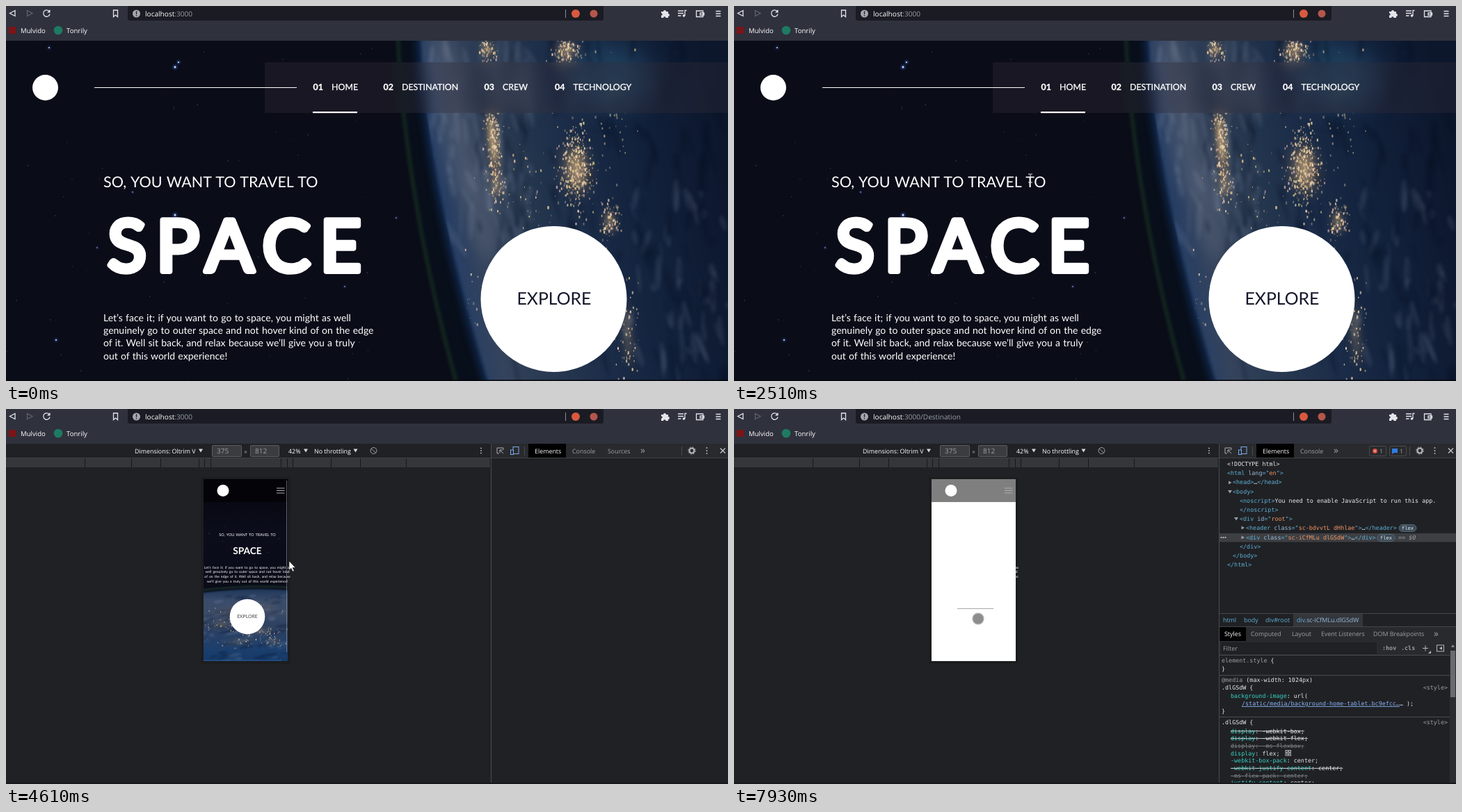
Recreate the animation shown at these times as an HTML page with a canvas. Size 1038 px wide and 540 px high, loop 8000 ms.

```html
<!DOCTYPE html>
<html lang="en">
<head>
<meta charset="utf-8">
<title>Space travel site walkthrough</title>
<style>
html, body { margin: 0; width: 100%; height: 100%; overflow: hidden; background: #121212; }
#stage { position: relative; width: 1038px; height: 540px; overflow: hidden; background: #121212; }
#stage > * { position: absolute; left: 0; top: 0; }
#stage > #wide { top: 50px; }
#stage > #small { left: 284px; top: 101px; }
text { white-space: pre; fill: #fff; text-rendering: geometricPrecision; }
.n { font-family: Lato, sans-serif; word-spacing: .05em; }
.u { font-family: "Open Sans", "Noto Sans", sans-serif; font-size: 8.9px; }
.m { font-family: "DejaVu Sans Mono", "Liberation Mono", monospace; font-size: 8.4px; }
.m text { fill: #e8eaed; }
.b { font-weight: 700; }
.mid { text-anchor: middle; }
.end { text-anchor: end; }
.nav { font-size: 12.4px; stroke: #fff; stroke-width: .3; }
.dim, .m .dim { fill: #9aa0a6; }
.ln { fill: none; stroke: #e4e5ea; stroke-width: 1.3; }
.tag { fill: #5db0d7; }
.attr { fill: #9bbbdc; }
.val { fill: #f29766; }
.prop { fill: #35d4c7; }
.off { text-decoration: line-through; }
.m .off.faint, .off.faint .prop { fill: #80868b; }
.link { fill: #8ab4f8; text-decoration: underline; }
</style>
</head>
<body>
<div id="stage">

<svg class="tools" width="1038" height="540">
  <rect y="50" width="1038" height="490" fill="#202124"/>
  <rect x="280" y="98" width="129" height="269" fill="#1c1d1f"/>
  <rect y="71" width="697" height="13" fill="#35363a"/>
  <path d="M0 70.5H1038" stroke="#3f4145"/>
  <path id="ticks" stroke="#17181a"/>
  <g class="u">
    <text x="185" y="63.5">Dimensions: Oltrim V</text>
    <g fill="#3b3c3f" stroke="#5b5d61"><rect x="296.500" y="52.500" width="42" height="16" rx="1"/><rect x="351.500" y="52.500" width="41" height="16" rx="1"/></g>
    <text class="dim" x="303" y="64" font-size="10">375</text>
    <text class="dim" x="358" y="64" font-size="10">812</text>
    <text class="dim" x="342" y="65">×</text>
    <text x="406" y="63.500">42%</text>
    <text x="443" y="63.500">No throttling</text>
    <path d="M277 57.500h6l-3 5zM428 57.500h6l-3 5zM499.500 57.500h6l-3 5z" fill="#d5d7da"/>
    <g fill="none" stroke="#9aa0a6"><circle cx="528.500" cy="60" r="4.500"/><path d="M525 57l7 6.500"/></g>
    <g fill="#a9adb2"><circle cx="683" cy="56.500" r="1"/><circle cx="683" cy="60" r="1"/><circle cx="683" cy="63.500" r="1"/></g>
  </g>
  <path d="M697.500 50V540" stroke="#4a4c50"/>

  <g class="u">
    <rect x="698" y="50" width="340" height="20" fill="#292a2d"/>
    <path d="M745.500 54V67M971.500 54V67" stroke="#4a4c50"/>
    <g fill="none" stroke="#a9adb2"><path d="M709 64h-3v-8h9v3M710 59l5 5m-5-5v4m0-4h4"/></g>
    <g fill="none" stroke="#7cacf0"><rect x="729" y="54.500" width="8" height="10"/><rect x="725.500" y="59" width="4" height="6.500" fill="#292a2d"/></g>
    <rect x="751" y="50" width="54" height="20" fill="#000"/>
    <text x="760" y="63.500">Elements</text>
    <text class="dim" x="814" y="63.500">Console</text>
    <g class="early"><text class="dim" x="865" y="63.500">Sources</text><text class="dim" x="912" y="64" font-size="14">»</text></g>
    <g class="late">
      <text class="dim" x="862" y="64" font-size="14">»</text>
      <g fill="none" stroke="#4a4c50"><rect x="913.500" y="53.500" width="24" height="14" rx="2"/><rect x="942.500" y="53.500" width="24" height="14" rx="2"/></g>
      <circle cx="921.500" cy="60.500" r="3.500" fill="#d8483e"/><path d="M920 59l3 3m0-3l-3 3" stroke="#fff" stroke-width=".8"/>
      <path d="M946 57h8v6h-5l-3 2z" fill="#2f7de0"/>
      <text class="dim" x="928" y="63.500">1</text><text class="dim" x="957" y="63.500">1</text>
    </g>
    <circle cx="986" cy="60" r="3.500" fill="none" stroke="#b5b8bc" stroke-width="2.200"/>
    <circle cx="986" cy="60" r="5.200" fill="none" stroke="#b5b8bc" stroke-dasharray="2 2.080"/>
    <g fill="#b5b8bc"><circle cx="1007.500" cy="56" r="1"/><circle cx="1007.500" cy="60" r="1"/><circle cx="1007.500" cy="64" r="1"/></g>
    <path d="M1027 56.500l7 7m0-7l-7 7" stroke="#c5c8cc" stroke-width="1.300"/>
  </g>

  <g class="dom">
    <rect x="698" y="179" width="340" height="12.500" fill="#3d3f43"/>
    <rect class="picked" x="698" y="179" width="340" height="12.500" fill="#073d69"/>
    <g id="tree" class="m"></g>
    <path d="M711 103.500l4.500 2.500-4.500 2.500zM710 117h6l-3 4.500zM719 156h6l-3 4.500zM729.500 168.500l4.500 2.500-4.500 2.500zM729.500 182.500l4.500 2.500-4.500 2.500z" fill="#9aa0a6"/>
    <g fill="#d0d3d7"><circle cx="700.500" cy="185" r="1"/><circle cx="703.500" cy="185" r="1"/><circle cx="706.500" cy="185" r="1"/></g>
    <g fill="#3b4b57" stroke="#5e7483" stroke-width=".8"><rect x="956" y="166.500" width="25" height="10" rx="5"/><rect x="925" y="180.500" width="25" height="10" rx="5"/></g>
    <g class="m mid" style="font-size:7.200px"><text x="968.500" y="174">flex</text><text x="937.500" y="188">flex</text></g>
    <text class="m dim" x="955" y="188" font-style="italic">== $0</text>
  </g>

  <g class="styles">
    <path d="M698 294.500H1038M698 313.500H1038" stroke="#45474b"/>
    <rect x="804" y="295" width="100" height="18" fill="#33363b"/>
    <g class="u">
      <text class="tag" x="703" y="307">html</text><text class="tag" x="733" y="307">body</text>
      <text class="tag" x="764" y="307">div#root</text>
      <text class="tag" x="809" y="307">div<tspan class="attr">.sc-iCfMLu.dlGSdW</tspan></text>
      <rect x="698" y="314" width="340" height="20" fill="#292a2d"/>
      <rect x="698" y="314" width="38" height="20" fill="#000"/>
      <text x="705" y="327">Styles</text>
      <text class="dim" x="743" y="327">Computed</text><text class="dim" x="802" y="327">Layout</text>
      <text class="dim" x="844" y="327">Event Listeners</text><text class="dim" x="919" y="327">DOM Breakpoints</text>
      <text class="dim" x="1006" y="328" font-size="14">»</text>
      <rect x="698" y="334" width="340" height="21" fill="#292a2d"/>
      <rect x="700" y="336" width="224" height="17" fill="#202124"/>
      <text class="dim" x="703" y="348">Filter</text>
    </g>
    <g class="m"><text class="b dim" x="932" y="347">:hov</text><text class="b dim" x="959" y="347">.cls</text></g>
    <path d="M990 344.500h8M994 340.500v8" stroke="#b5b8bc"/><path d="M1002 348v4h-4z" fill="#b5b8bc"/>
    <rect x="1010.500" y="340" width="10" height="9" fill="none" stroke="#b5b8bc"/><path d="M1018 342v5l-4-2.500z" fill="#b5b8bc"/>
    <path d="M698 354.500H1030M698 383.500H1030M698 443.500H1030" stroke="#4a4c50"/>
    <g id="rules" class="m"></g>
    <g fill="#35383b" stroke="#aeb2b6"><rect x="793" y="491.500" width="3" height="3"/><rect x="797.500" y="491.500" width="3" height="3"/><rect x="793" y="496" width="3" height="3"/><rect x="797.500" y="496" width="3" height="3"/></g>
    <rect x="1029" y="335" width="9" height="205" fill="#2b2c2f"/>
    <rect x="1030" y="348" width="7" height="67" fill="#6a6b6d"/>
    <path d="M1031 343l2.500-4 2.500 4z" fill="#85878a"/>
  </g>
  <rect y="538" width="1038" height="2" fill="#17181b"/>
</svg>

<canvas id="small" class="photo" width="121" height="262"></canvas>

<svg width="1038" height="540">
  <defs><clipPath id="view"><rect x="284" y="101" width="108" height="249"/></clipPath></defs>
  <g class="squeezed">
    <g clip-path="url(#view)">
      <circle cx="339" cy="407" r="86" fill="#fff"/>
      <rect x="376" y="255" width="16" height="95" fill="#000" opacity=".24"/>
      <text class="n b mid" x="338.500" y="126.500" style="font-size:31px;fill:#8b8b8b">SPACE</text>
      <g stroke="#fff" stroke-width="2"><path d="M351 130.500h20M351 138.500h20M351 146.500h20"/></g>
      <circle cx="335.500" cy="138.500" r="18.500" fill="#fff"/>
      <g id="cropped" class="n mid" font-size="11.400"></g>
    </g>
    <path d="M392 101h13v249h-13zM284 350h108v13H284z" fill="#f1f1f1"/>
    <rect x="392" y="350" width="13" height="13" fill="#dcdcdc"/>
    <path d="M394 114h10v141h-10zM297 352h61v10h-61z" fill="#c1c1c1"/>
    <path d="M395.500 110h6l-3-4zM292 353.500v6l-4-3z" fill="#a3a3a3"/>
    <path d="M395.500 341h6l-3 4zM385 353.500v6l4-3z" fill="#505050"/>
  </g>
  <g class="tools">
    <rect x="284" y="101" width="121" height="33" fill="#030308"/>
    <g class="n mid">
      <text x="347" y="183" font-size="5.500">SO, YOU WANT TO TRAVEL TO</text>
      <text class="b" x="347" y="209" font-size="13.700">SPACE</text>
      <g id="blurb" font-size="5.050"></g>
      <circle cx="347" cy="299" r="25.300" fill="#fff"/>
      <text x="347" y="301.300" style="font-size:6.900px;fill:#45464d">EXPLORE</text>
    </g>
    <g class="fresh"><path d="M403.500 103V350" stroke="#8b8d96" opacity=".7"/><path d="M284 362H396" stroke="#2d5f9c"/></g>
    <g class="white">
      <rect x="284" y="101" width="121" height="262" fill="#fff"/>
      <rect x="284" y="101" width="121" height="33" fill="#7f7f7f"/>
      <path d="M321 287.500h52" stroke="#a8a8a8"/>
    </g>
    <circle cx="312" cy="117.500" r="8.500" fill="#fff"/>
    <path d="M389 114h11.500M389 117.500h11.500M389 121h11.500" stroke="#b0b0b0" stroke-width="1.200"/>
  </g>
</svg>

<canvas id="wide" class="home" width="1038" height="490"></canvas>

<svg width="1038" height="540">
  <g class="home">
    <circle cx="56.500" cy="117.500" r="18.500" fill="#fff"/>
    <path d="M127 117.500H418" stroke="#fff"/>
    <g class="n nav">
      <text class="b" x="441.500" y="121">01</text><text x="468" y="121">HOME</text>
      <text class="b" x="542.500" y="121">02</text><text x="569" y="121">DESTINATION</text>
      <text class="b" x="687.500" y="121">03</text><text x="714" y="121">CREW</text>
      <text class="b" x="789" y="121">04</text><text x="815.500" y="121">TECHNOLOGY</text>
    </g>
    <rect x="441" y="152" width="64" height="2.200" fill="#fff"/>
    <text class="n" x="140" y="261" font-size="21.500">SO, YOU WANT TO TRAVEL TO</text>
    <text class="n" x="146" y="382" font-size="103" letter-spacing="14" stroke="#fff" stroke-width="8" stroke-linejoin="round">SPACE</text>
    <g id="intro" class="n" font-size="14"></g>
    <circle cx="787.500" cy="422" r="105" fill="#fff"/>
    <text class="n mid" x="788" y="430" style="font-size:24.800px;fill:#15172a">EXPLORE</text>
    <rect y="538" width="1038" height="2" fill="#05060b" opacity=".7"/>
  </g>

  <g class="menu">
    <rect x="749.500" y="336.500" width="290" height="200" fill="#242528" stroke="#3a3b3e"/>
    <rect id="hover" x="750" width="288" height="18" fill="#3e3f42"/>
    <path d="M750 397.500H1038M750 441.500H1038M750 468.500H1038M750 495.500H1038" stroke="#3c3d41"/>
    <g id="items" class="u"></g>
    <rect x="758" y="450" width="10" height="10" fill="none" stroke="#9aa0a6" stroke-width="1.500" stroke-dasharray="3 1"/>
    <circle cx="763" cy="482" r="5.500" fill="#e8602f"/>
    <path d="M1031 479l4 3-4 3z" fill="#b5b8bc"/>
  </g>

  <rect width="1038" height="50" fill="#2f313d"/>
  <path d="M175 0h684v18a3 3 0 0 1-3 3H178a3 3 0 0 1-3-3z" fill="#1a1b23"/>
  <path class="ln" d="M13 6.500v8L5.500 10.500z"/>
  <path class="ln" d="M30.500 6.500v8l7.500-4z" style="stroke:#60626d"/>
  <path class="ln" d="M62 7.500a4.700 4.700 0 1 0 1 4" stroke-width="1.500"/><path d="M63.500 5v4.500H59z" fill="#e4e5ea"/>
  <path class="ln" d="M154.500 6h6v9.500l-3-2.500-3 2.500z"/>
  <circle cx="187.500" cy="11" r="5.500" fill="#a5a7ae"/><path d="M187.500 7.500v4.200m0 1.300v1.500" stroke="#1a1b23" stroke-width="1.400"/>
  <g class="u">
    <text x="200" y="14.700" style="font-size:10.100px">localhost<tspan class="dim">:3000</tspan><tspan class="dim white">/Destination</tspan></text>
    <text x="21" y="38.500" style="font-size:9.600px">Mulvido</text>
    <text x="87" y="38.500" style="font-size:9.600px">Tonrily</text>
  </g>
  <rect x="4" y="30" width="10" height="10" fill="#7d1416"/>
  <circle cx="75" cy="35" r="6.300" fill="#1f7a62"/>
  <path d="M804.500 5V17" stroke="#8b8d95"/>
  <circle cx="819" cy="11" r="6" fill="#d9593f"/>
  <circle cx="845" cy="11" r="5.500" fill="#b5564c"/>
  <g fill="#e4e5ea"><path d="M942 8h3a2 2 0 1 1 4 0h3v3a2 2 0 1 1 0 4v2h-3.500a1.700 1.700 0 0 0-3.400 0H942v-3.400a1.700 1.700 0 0 0 0-3.400z"/><circle cx="974.500" cy="14" r="1.800"/></g>
  <path class="ln" d="M966 7h8M966 10.500h8M966 14h4.500M976 14V6.500h2.500"/>
  <path class="ln" d="M992.500 7h9.500v8.500h-9.500zM998 10h5.500v3h-5.500zM1020.500 7.500h7M1020.500 11h7M1020.500 14.500h7"/>

  <g id="cursor">
    <circle class="click" cy="-2" r="9.500" fill="#b9b11c" opacity=".95"/>
    <path class="arrow" d="M0 0v13l3-2.700 2.200 4.700 2-.9-2.200-4.600h4z" fill="#fff" stroke="#222" stroke-width=".6"/>
    <path class="hand" d="M0 0v9l-2.500-2-1.300 1.300L0 14.500h7.500L9 10V5L6.800 4.500 4.500 4 2.200 3.500V0A1.100 1.100 0 0 0 0 0z" fill="#fff" stroke="#222" stroke-width=".8"/>
    <path class="beam" d="M-3-6h2.500l.5.600.5-.6H3M0-5.400V5.400M-3 6h2.500l.5-.6.5.6H3" fill="none" stroke="#e8e8ee"/>
    <circle class="touch" r="8" fill="#707070" fill-opacity=".8" stroke="#b5b5b5" stroke-opacity=".8" stroke-width="1.500"/>
  </g>
</svg>
</div>

<script>
const $ = id => document.getElementById(id);
const esc = s => s.replace(/&/g, '&amp;').replace(/</g, '&lt;');
const line = (x, y, body, cls = '') => `<text class="${cls}" x="${x}" y="${y}">${body}</text>`;
const lines = (x, y, step, rows) => rows.map((r, i) => line(x, y + i * step, r)).join('');

// Timeline: moments (ms) at which each class appears and disappears in turn
const LOOP = 8000, pct = ms => ms / LOOP * 100 + '%';
const spans = {
  home: [0, 3790], menu: [130, 1680], photo: [3790], squeezed: [3790, 4070], tools: [4070],
  fresh: [4070, 4680], dom: [4680], styles: [4830], early: [0, 5440], late: [5440],
  picked: [0, 7690], white: [7770], click: [1610, 1680],
  arrow: [70, 1680, 2000, 2450, 3790, 4680], hand: [1680, 2000], beam: [2450, 3790], touch: [4680]
};
const path = [
  [0, 752, 338], [70, 752, 338], [470, 757, 341], [670, 757, 341], [1330, 800, 524], [1680, 800, 515],
  [1900, 738, 394], [2130, 645, 175], [2380, 541, 258], [2510, 426, 248], [3860, 426, 248],
  [4540, 407, 219], [4610, 407, 219], [5380, 396, 200], [5440, 396, 200], [5920, 395, 117],
  [6140, 395, 117], [6820, 351, 302], [8000, 351, 302]
];
const hovers = [[0, -60], [800, 358], [870, 376], [950, 420], [1010, 446], [1080, 473], [1150, 500], [1220, 517]];

let css = '';
for (const [name, times] of Object.entries(spans)) {
  const keys = times.map((t, i) => `${pct(t)}{opacity:${1 - i % 2}}`).join('');
  css += `@keyframes ${name}{0%{opacity:0}${keys}100%{opacity:${times.length % 2}}}` +
    `.${name}{animation:${name} ${LOOP}ms step-end infinite}`;
}
css += `@keyframes move{${path.map(([t, x, y]) => `${pct(t)}{transform:translate(${x}px,${y}px)}`).join('')}}` +
  `#cursor{animation:move ${LOOP}ms linear infinite}` +
  `@keyframes hover{${hovers.map(([t, y]) => `${pct(t)}{transform:translateY(${y}px)}`).join('')}100%{transform:translateY(517px)}}` +
  `#hover{animation:hover ${LOOP}ms step-end infinite}`;
document.head.appendChild(document.createElement('style')).textContent = css;

// Copy
$('intro').innerHTML = lines(140, 453.5, 18.4, [
  'Let’s face it; if you want to go to space, you might as well',
  'genuinely go to outer space and not hover kind of on the edge',
  'of it. Well sit back, and relax because we’ll give you a truly',
  'out of this world experience!']);
$('blurb').innerHTML = lines(347, 229.5, 6.9, [
  'Let’s face it; if you want to go to space, you might as',
  'well genuinely go to outer space and not hover kind',
  'of on the edge of it. Well sit back, and relax because',
  'we’ll give you a truly out of this world experience!']);
$('cropped').innerHTML = lines(328, 175.5, 15.4, [
  '<tspan fill="#77777c">Let’s face it; if you want to</tspan>', 'to space, you might as well',
  'genuinely go to outer space', 'not hover kind of on the edge', 'of it. Well sit back, and relax',
  'because we’ll give you a truly', 'out of this world experience!']);

$('items').innerHTML = [
  [349, 'Voltar', 'Alt+Seta para a esquerda'], [367, 'Avançar', 'Alt+Seta para a direita'],
  [384.5, 'Recarregar', 'Ctrl+R'], [410.5, 'Salvar como...', 'Ctrl+S'], [428, 'Imprimir...', 'Ctrl+P'],
  [455, 'Criar código QR para esta página', ''], [482, 'Talvo', ''],
  [508, 'Exibir código fonte da página', 'Ctrl+U'], [525.5, 'Inspecionar', '']
].map(([y, label, keys], i) => line(779, y + 3.4, label, i == 1 ? 'dim' : '') + line(1023, y + 3.4, keys, 'end dim')).join('');

$('ticks').setAttribute('d', [113, 180, 222, 277, 285, 294, 395, 404, 412, 467, 509, 575, 696]
  .map(x => `M${x}.5 71v13`).join(''));

// Developer tools
const markup = s => s.replace(/(\w+)="([^"]*)"|<\/?\w+|>|[^<>]/g, (m, name, value) =>
  name ? `<tspan class="attr">${name}</tspan><tspan class="tag">="</tspan><tspan class="val">${value}</tspan><tspan class="tag">"</tspan>`
    : /[<>]/.test(m) ? `<tspan class="tag">${esc(m)}</tspan>` : m);
$('tree').innerHTML = [
  [709, '<!DOCTYPE html>'], [709, '<html lang="en">'], [717, '<head>…</head>'], [717, '<body>'],
  [727, '<noscript>You need to enable JavaScript to run this app.'], [727, '</noscript>'],
  [727, '<div id="root">'], [736, '<header class="sc-bdvvtL dHhlae">…</header>'],
  [736, '<div class="sc-iCfMLu dlGSdW">…</div>'], [727, '</div>'], [717, '</body>'], [709, '</html>']
].map(([x, s], i) => line(x, 82 + i * 13.2, i ? markup(s) : esc(s))).join('');

const rule = (y, prop, value, cls = '') => line(714, y, `<tspan class="prop">${prop}</tspan>: ${value}`, cls);
const origin = y => line(1026, y, '&lt;style>', 'end dim');
$('rules').innerHTML =
  line(701, 365, '<tspan class="dim">element.style</tspan> {') + line(701, 377, '}') +
  line(701, 393, '<tspan class="dim">@media</tspan> (max-width: 1024px)') +
  line(701, 404, '.dlGSdW {') + origin(404) + rule(416, 'background-image', 'url(') +
  line(730, 427, '<tspan class="link">/static/media/background-home-tablet.bc9efcc…</tspan>… );') +
  line(701, 438, '}') + line(701, 454, '.dlGSdW {') + origin(454) +
  rule(466.5, 'display', '-webkit-box;', 'off') + rule(477, 'display', '-webkit-flex;', 'off') +
  rule(488, 'display', '-ms-flexbox;', 'off faint') + rule(498.5, 'display', 'flex;') +
  rule(509, '-webkit-box-pack', 'center;') + rule(520, '-webkit-justify-content', 'center;', 'off') +
  rule(531, '-ms-flex-pack', 'center;', 'off faint') + rule(541, 'justify-content', 'center;');

// Backdrops: soft tones plus seeded specks
let seed = 7;
const rnd = () => (seed = seed * 16807 % 2147483647) / 2147483647;
const spread = () => rnd() + rnd() + rnd() - 1.5;

function blob(c, x, y, rx, ry, tilt, color, blur) {
  c.filter = `blur(${blur}px)`;
  c.fillStyle = color;
  c.beginPath();
  c.ellipse(x, y, rx, ry, tilt, 0, 7);
  c.fill();
  c.filter = 'none';
}
function lights(c, x, y, rx, ry, count, size, glow) {
  blob(c, x, y, rx * .9, ry * .9, -.1, `rgba(190,145,95,${glow})`, Math.min(rx, ry) * .6);
  blob(c, x, y, rx * .4, ry * .6, -.1, `rgba(255,215,155,${glow})`, Math.min(rx, ry) * .4);
  for (let i = 0; i < count; i++) {
    c.fillStyle = `rgba(255,${205 + rnd() * 35 | 0},${140 + rnd() * 70 | 0},${.25 + rnd() * .6})`;
    const s = size * (.4 + rnd());
    c.fillRect(x + spread() * rx * 1.5, y + spread() * ry * 1.5, s, s * 1.8);
  }
}
function wisps(c, count, x, y, w, h, long, color) {
  for (let i = 0; i < count; i++)
    blob(c, x + rnd() * w, y + rnd() * h, 1 + rnd() * 4, long * (.2 + rnd()), spread() * .4 - .15, color, 2.5);
}
function stars(c, x, y, w, h, count, size) {
  for (let i = 0; i < count; i++) {
    c.fillStyle = `rgba(150,165,205,${.1 + rnd() * .4})`;
    c.fillRect(x + rnd() * w, y + rnd() * h, size, size);
  }
}
function fade(c, x0, y0, x1, y1, colors) {
  const g = c.createLinearGradient(x0, y0, x1, y1);
  colors.forEach((color, i) => g.addColorStop(i / (colors.length - 1), color));
  return g;
}

function drawWide() {
  const c = $('wide').getContext('2d');
  c.translate(0, -50);
  c.fillStyle = '#0a0c18';
  c.fillRect(0, 50, 1038, 490);
  stars(c, 0, 50, 570, 490, 75, 1.2);
  for (const [x, y, r] of [[243, 88, 2], [248, 81, 1.6], [62, 60, 1.3], [243, 301, 2], [72, 481, 1.5], [131, 348, 1], [182, 268, 1], [561, 305, 1], [487, 404, 1]]) {
    blob(c, x, y, r * 1.5, r * 1.5, 0, 'rgba(60,110,210,.6)', 1.5);
    blob(c, x, y, r * .7, r * .7, 0, '#cfdcf5', .4);
  }
  const halo = new Path2D('M563 40C570 200 600 370 648 545H1060V40Z');
  const globe = new Path2D('M596 40C600 200 650 400 694 545H1060V40Z');
  c.fillStyle = '#080f1b';
  c.fill(halo);
  c.lineWidth = 5;
  c.strokeStyle = '#14291f';
  c.filter = 'blur(2px)';
  c.stroke(halo);
  c.lineWidth = 9;
  c.strokeStyle = '#13305e';
  c.filter = 'blur(6px)';
  c.stroke(globe);
  c.filter = 'blur(2px)';
  c.fillStyle = fade(c, 605, 330, 1038, 250, ['#1b3b6b', '#35435c', '#26374f', '#1c2d49', '#14243f', '#101d36', '#0c172c']);
  c.fill(globe);
  c.filter = 'none';
  c.save();
  c.clip(globe);
  [[630, 85, 20, 45], [650, 200, 22, 80], [685, 300, 22, 70], [735, 110, 18, 50]]
    .forEach(([x, y, rx, ry]) => blob(c, x, y, rx, ry, -.2, 'rgba(115,125,145,.3)', 12));
  blob(c, 870, 100, 60, 45, .2, 'rgba(45,95,130,.45)', 18);
  wisps(c, 90, 605, 50, 150, 300, 30, 'rgba(150,162,182,.14)');
  wisps(c, 50, 890, 270, 150, 270, 22, 'rgba(130,145,170,.16)');
  wisps(c, 110, 680, 50, 360, 490, 30, 'rgba(5,12,28,.25)');
  [[700, 195, 8, 50, 170, .5], [820, 235, 17, 38, 330, .5], [805, 65, 14, 16, 130, .45], [692, 62, 9, 13, 60, .35],
    [868, 310, 9, 20, 80, .3], [893, 470, 10, 55, 70, .15], [705, 255, 9, 25, 50, .25],
    [760, 260, 50, 45, 70, 0], [850, 160, 40, 60, 90, 0], [665, 440, 12, 60, 25, 0]]
    .forEach(([x, y, rx, ry, n, glow]) => lights(c, x, y, rx, ry, n, 1.7, glow));
  c.restore();
  // Frosted navigation strip
  c.save();
  c.beginPath();
  c.rect(372, 81, 666, 73);
  c.clip();
  c.filter = 'blur(8px)';
  c.drawImage($('wide'), 0, 50);
  c.filter = 'none';
  c.fillStyle = 'rgba(50,46,56,.34)';
  c.fillRect(372, 81, 666, 73);
  c.restore();
}

function drawSmall() {
  const c = $('small').getContext('2d');
  c.translate(-284, -101);
  c.fillStyle = fade(c, 0, 101, 0, 260, ['#05060d', '#0b0d1b', '#090b17']);
  c.fillRect(284, 101, 121, 262);
  stars(c, 284, 135, 121, 115, 24, .9);
  const globe = new Path2D('M280 265Q345 256 410 261V370H280Z');
  c.lineWidth = 2;
  c.strokeStyle = '#1d352f';
  c.filter = 'blur(1px)';
  c.stroke(new Path2D('M280 261Q345 253 410 257'));
  c.fillStyle = fade(c, 0, 258, 0, 363, ['#1c3558', '#3a4c6b', '#3b4b68', '#2f4262', '#263f66', '#1c3f6d', '#163a68']);
  c.fill(globe);
  c.filter = 'none';
  c.save();
  c.clip(globe);
  for (let i = 0; i < 80; i++)
    blob(c, 284 + rnd() * 121, 266 + rnd() * 97, 3 + rnd() * 10, .6 + rnd() * 2, -.15, rnd() < .5 ? 'rgba(150,165,190,.16)' : 'rgba(8,18,42,.3)', 1);
  [[365, 320, 22, 5, 70], [310, 310, 18, 6, 40], [385, 335, 14, 5, 35], [335, 335, 30, 5, 30], [345, 290, 50, 8, 25]]
    .forEach(a => lights(c, ...a, .9, .12));
  c.restore();
}

drawWide();
drawSmall();
</script>
</body>
</html>
```
